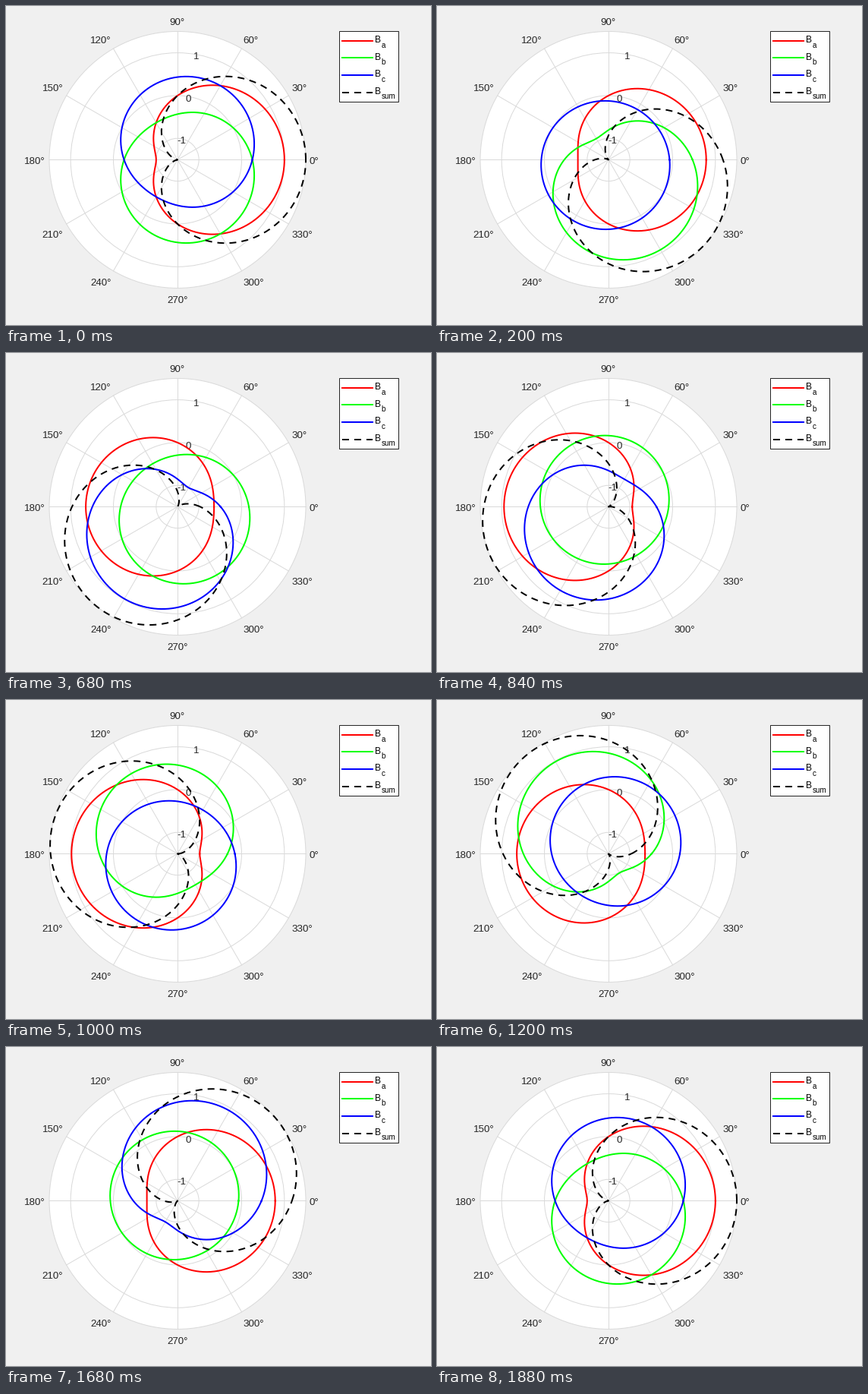
A matplotlib script for the animation above (1920 ms loop, 560x420 px).

```python
import numpy as np
import matplotlib.pyplot as plt
from matplotlib.animation import FuncAnimation
from matplotlib.patches import Circle, Rectangle

W, H, DPI = 560, 420, 100
FRAMES, STEP_MS = 48, 40
PX = 72 / DPI                       # points per pixel
CX, CY, R = 226.0, 202.45, 169      # polar plot in pixels
R_MIN, R_MAX = -1.5, 1.5
GRID, INK = "#dadada", "#262626"
DASH = (0, (4.5, 3.5))

plt.rcParams["font.family"] = "Liberation Sans"
fig = plt.figure(figsize=(W / DPI, H / DPI), dpi=DPI, facecolor="#f0f0f0")
ax = fig.add_axes([0, 0, 1, 1])
ax.set_xlim(0, W)
ax.set_ylim(H, 0)
ax.axis("off")


def to_xy(theta, r):
    rho = (r - R_MIN) / (R_MAX - R_MIN) * R
    return CX + rho * np.cos(theta), CY - rho * np.sin(theta)


def label(x, y, text, size, color=INK, ha="left", z=2):
    ax.text(x, y, text, fontsize=size * PX, color=color, ha=ha,
            va="baseline", zorder=z)


def draw_grid():
    ax.add_patch(Circle((CX, CY), R, fc="white", ec="none", zorder=0))
    for deg in range(0, 360, 30):
        x, y = to_xy(np.radians(deg), R_MAX)
        ax.plot([CX, x], [CY, y], color=GRID, lw=PX, zorder=1)
    for r in (-1, 0, 1, R_MAX):
        rho = (r - R_MIN) / (R_MAX - R_MIN) * R
        ax.add_patch(Circle((CX, CY), rho, fc="none", ec=GRID, lw=PX, zorder=1))


def draw_tick_labels():
    for deg in range(0, 360, 30):
        a = np.radians(deg)
        c, s = np.cos(a), np.sin(a)
        x, y = CX + (R + 4.8) * c, CY - (R + 4.8) * s
        ha = "center" if abs(c) < 0.01 else "left" if c > 0 else "right"
        # baseline sits above, level with, or below the anchor
        dy = 5.7 if abs(s) < 0.01 else -3.3 if s > 0 else 15.2
        label(x - 0.2, y + dy, f"{deg}°", 13.33, ha=ha)
    for r in (-1, 0, 1):
        x, y = to_xy(np.radians(80), r)
        label(x, y + 6.3, str(r), 13.33, ha="center")


def draw_legend(entries):
    ax.add_patch(Rectangle((439, 33), 78, 93, fc="white", ec=INK,
                           lw=PX, zorder=4))
    for i, (sub, color, style) in enumerate(entries):
        y = 45.9 + 22.55 * i
        ax.plot([443, 483], [y, y], color=color, ls=style, lw=2 * PX,
                zorder=5)
        label(486, y + 2.4, "B", 12, "black", z=5)
        label(494.7, y + 8.8, sub, 9.9, "black", z=5)


SERIES = [("a", "#ff0000", "-"), ("b", "#00ff00", "-"),
          ("c", "#0000ff", "-"), ("sum", "#000000", DASH)]
draw_grid()
draw_tick_labels()
draw_legend(SERIES)

theta = np.linspace(0, 2 * np.pi, 721)
curves = [ax.plot([], [], color=color, ls=style, lw=2 * PX, zorder=3)[0]
          for _, color, style in SERIES]


def update(k):
    wt = 2 * np.pi * k / (FRAMES - 1)
    shifts = np.radians([0, 120, 240])
    fields = [np.cos(wt + p) * np.cos(theta - p) for p in shifts]
    fields.append(sum(fields))
    for curve, field in zip(curves, fields):
        curve.set_data(*to_xy(theta, field))
    return curves


anim = FuncAnimation(fig, update, frames=FRAMES, interval=STEP_MS,
                     repeat=True, repeat_delay=0, blit=False)
plt.show()
```
